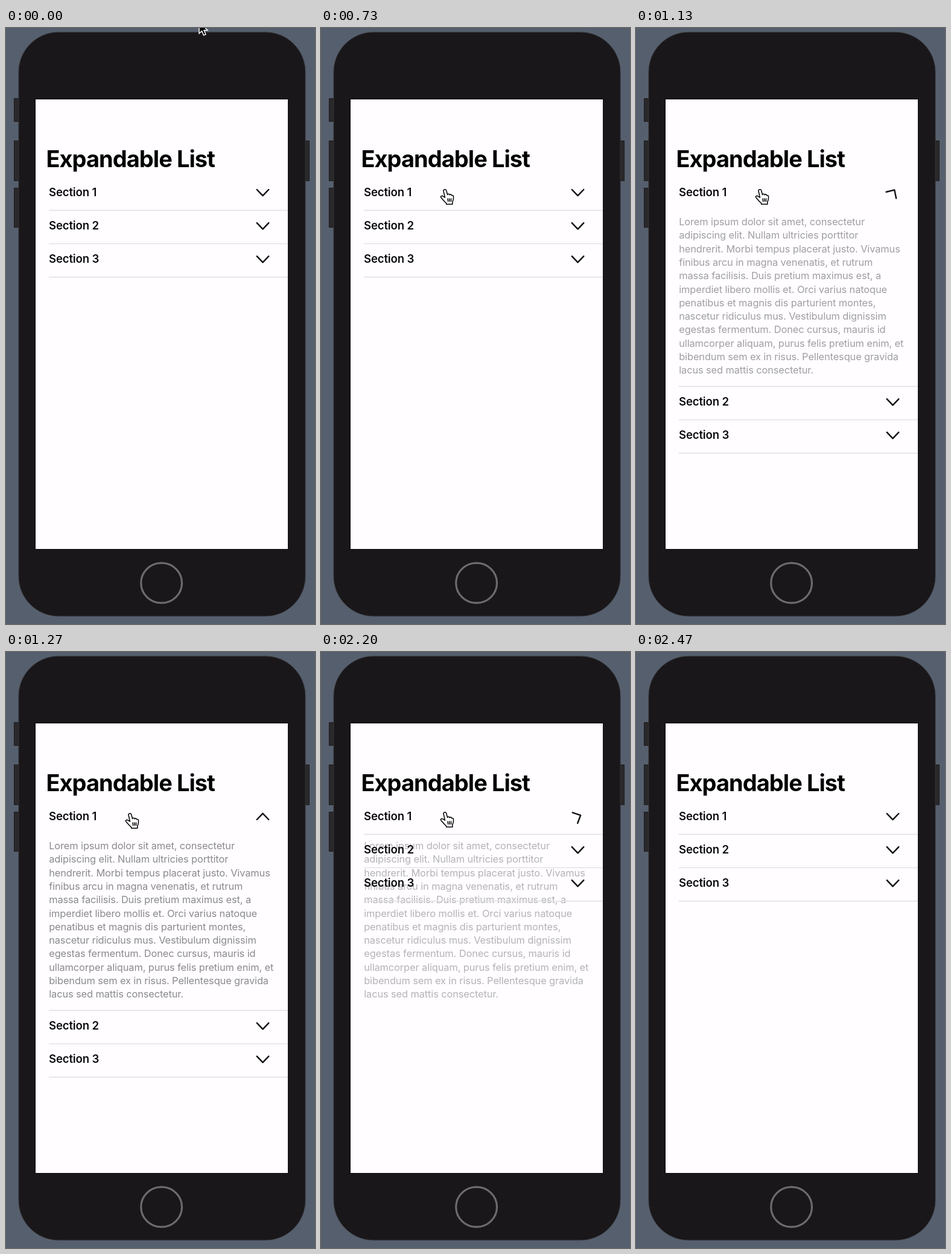
An HTML page that plays this animation: 512x985 px, repeating every 3.27 s.

```html
<!DOCTYPE html>
<html lang="en">
<head>
<meta charset="utf-8">
<title>Expandable List</title>
<style>
  html, body { margin: 0; width: 100%; height: 100%; overflow: hidden; background: #565f6e; }
  svg { display: block; width: 100%; height: 100%; font-family: Inter, "Liberation Sans", sans-serif; }
  .title { font-size: 37.9px; font-weight: 700; letter-spacing: -.9px; }
  .head { font-size: 18.6px; font-weight: 600; letter-spacing: -.16px; fill: #0b0a0c; }
  .body { font-size: 16.4px; letter-spacing: -.11px; fill: #8a898d; }
  .line { stroke: #e3e2e6; stroke-width: 1.6; }
  .chevron { fill: none; stroke: #111; stroke-width: 2.4; stroke-linecap: round; stroke-linejoin: round; }
</style>
</head>
<body>
<svg viewBox="0 0 512 985">
  <g fill="#29282a" stroke="#1d1c1e">
    <rect x="13.5" y="116.5" width="10" height="38"/>
    <rect x="13.5" y="186.5" width="10" height="66"/>
    <rect x="13.5" y="264.5" width="10" height="65"/>
    <rect x="492" y="186.5" width="10.5" height="66"/>
  </g>
  <rect x="21" y="7" width="475" height="965" rx="66" fill="#191719" stroke="#343438"/>
  <ellipse cx="257.6" cy="917.2" rx="33.9" ry="33" fill="none" stroke="#6d6b6d" stroke-width="3.2"/>
  <rect x="48.5" y="117.5" width="419" height="744" fill="#fffdff" stroke="#0c0b0d"/>
  <text class="title" x="66.4" y="229.5">Expandable List</text>
  <g id="body" class="body"></g>
  <g id="rows"></g>
  <g id="hand" fill="#fff" stroke="#000" stroke-width="1.5" stroke-linejoin="round" stroke-linecap="round">
    <path d="M-1 2.5C-1.5 -.5 2.6 -1.1 3.6 1.5L5.6 8.5C6 6.8 8.8 6.8 9.2 8.9C10 7.5 12.2 7.7 12.7 9.8C14 8.9 15.6 9.9 15.6 12.5C15.6 16.5 15 18.5 13.8 20.5V24.2H3.8L3.2 22C0 19.5 -2 16.5 -5 13.5C-7 11 -3.4 9.5 -1.4 11.3L1.4 13.1Z"/>
    <path d="M6 15L6.6 19.5M8.7 15L9 19.5M11.5 15V19.5" fill="none"/>
  </g>
  <path id="arrow" d="M0 0V19L4.5 15L7.5 22L11 20.5L8 13.8H14Z" stroke="#fff" stroke-width="1.5"/>
</svg>
<script>
const $ = id => document.getElementById(id);
const LOOP = 3270, FPS = 15, OPEN = 930, CLOSE = 2054, FADE = 350;

const lines = [
  "Lorem ipsum dolor sit amet, consectetur",
  "adipiscing elit. Nullam ultricies porttitor",
  "hendrerit. Morbi tempus placerat justo. Vivamus",
  "finibus arcu in magna venenatis, et rutrum",
  "massa facilisis. Duis pretium maximus est, a",
  "imperdiet libero mollis et. Orci varius natoque",
  "penatibus et magnis dis parturient montes,",
  "nascetur ridiculus mus. Vestibulum dignissim",
  "egestas fermentum. Donec cursus, mauris id",
  "ullamcorper aliquam, purus felis pretium enim, et",
  "bibendum sem ex in risus. Pellentesque gravida",
  "lacus sed mattis consectetur."
];
$("body").innerHTML = lines.map((s, i) => `<text x="71.2" y="${326 + i * 22.3}">${s}</text>`).join("");

$("rows").innerHTML = [0, 1, 2].map(i => `<g transform="translate(0 ${i * 55.1})"><g class="row">
  <text class="head" x="71" y="278.3">Section ${i + 1}</text>
  <path class="chevron" d="M-9.8 -5L0 5.2L9.8 -5" transform="translate(425.5 272)"/>
  <path class="line" d="M71 301.4H467"/></g></g>`).join("");
const rows = [...document.querySelectorAll(".row")];
const rule = document.querySelector(".line"), chevron = document.querySelector(".chevron");

// Pointer path: [ms, x, y]
const path = [[400, 210, 237], [467, 205, 251], [533, 207, 258], [600, 203, 262], [667, 203, 265],
  [733, 204, 267], [2133, 204, 267], [2200, 204, 265], [2267, 202.5, 258.5], [2333, 222, 170], [2400, 262, 26], [2467, 310, -60]];

function pointer(t) {
  if (t < 400) {
    const left = (1 - t / 400) ** 2;
    return [210 + 110 * left, 237 - 247 * left];
  }
  const i = path.findIndex(p => p[0] > t);
  if (i < 0) return [310, -60];
  const [a, b] = [path[i - 1], path[i]], k = (t - a[0]) / (b[0] - a[0]);
  return [a[1] + (b[1] - a[1]) * k, a[2] + (b[2] - a[2]) * k];
}

// cubic-bezier(.42, 0, .58, 1)
function easeInOut(x) {
  x = Math.min(1, Math.max(0, x));
  let lo = 0, hi = 1, s = .5;
  for (let i = 0; i < 16; i++) {
    s = (lo + hi) / 2;
    const u = 1 - s;
    if (1.26 * s * u * u + 1.74 * s * s * u + s ** 3 < x) lo = s; else hi = s;
  }
  return s * s * (3 - 2 * s);
}

function draw(now) {
  const t = Math.floor((now % LOOP + 4) * FPS / 1000) * 1000 / FPS;
  const expanded = t > OPEN && t < CLOSE;
  const shown = t < OPEN ? 0 : t < CLOSE ? easeInOut((t - OPEN + 44) / FADE) : 1 - easeInOut((t - CLOSE) / FADE);
  const shift = `translate(0 ${expanded ? 291 : 0})`;
  rows[1].setAttribute("transform", shift);
  rows[2].setAttribute("transform", shift);
  rule.setAttribute("transform", shift);
  chevron.setAttribute("transform", `translate(425.5 272) rotate(${-180 * shown})`);
  $("body").setAttribute("opacity", shown);

  const [x, y] = pointer(t), onScreen = y > 118;
  for (const id of ["hand", "arrow"]) {
    $(id).setAttribute("transform", `translate(${x} ${y})`);
    $(id).style.display = (id === "hand") === onScreen ? "" : "none";
  }
  requestAnimationFrame(() => draw(performance.now()));
}
draw(0);
</script>
</body>
</html>
```
